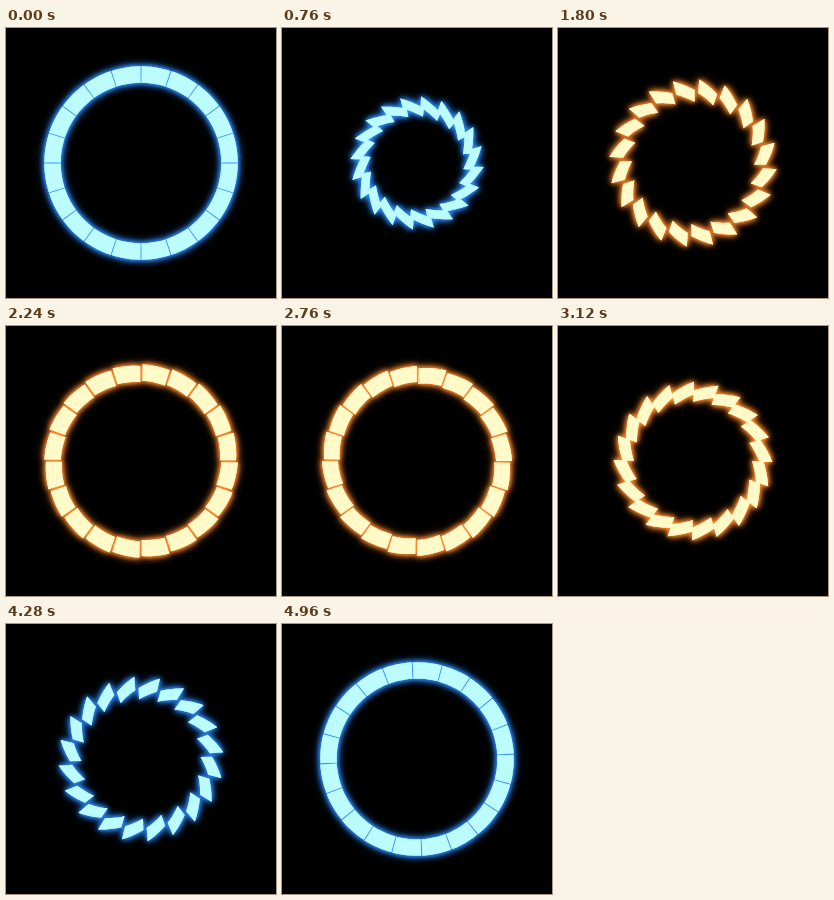
These frames come from a looping animation (270x270 px, 5 s). An HTML page with a canvas:

```html
<!DOCTYPE html>
<html>
<head>
<meta charset="utf-8">
<style>
  html, body { margin: 0; height: 100%; overflow: hidden; background: #000; }
  canvas { display: block; }
</style>
</head>
<body>
<canvas width="270" height="270"></canvas>
<script>
const ctx = document.querySelector('canvas').getContext('2d');
const LOOP = 5000, STEP = 40, COUNT = 20, CENTER = 135;
const INNER = 80.3, OUTER = 96.7, DEPTH = 820;
const SLICE = 2 * Math.PI / COUNT, GAP = 0.005, ARC_STEPS = 6;
const FRONT = { fill: '#bcfcff', glow: '#2f8cff' };
const BACK = { fill: '#fffac8', glow: '#ff8a30' };

// A point on a ring that is flipped by `flip` around the axis at `axis`.
function project(radius, angle, flip, axis) {
  const x = radius * Math.cos(angle);
  const y = radius * Math.sin(angle) * Math.cos(flip);
  const z = radius * Math.sin(angle) * Math.sin(flip);
  const scale = DEPTH / (DEPTH + z);
  const c = Math.cos(axis), s = Math.sin(axis);
  return [CENTER + scale * (x * c - y * s), CENTER + scale * (x * s + y * c)];
}

function addPanel(path, flip, axis) {
  const from = flip + GAP, span = SLICE - 2 * GAP;
  const points = [];
  for (let k = 0; k <= ARC_STEPS; k++) {
    const angle = from + span * k / ARC_STEPS;
    points.push(project(OUTER, angle, flip, axis));
    points.unshift(project(INNER, angle, flip, axis));
  }
  points.forEach(([x, y], k) => k ? path.lineTo(x, y) : path.moveTo(x, y));
  path.closePath();
}

function draw(time) {
  // Each panel slides along its ring at the same rate as that ring flips.
  const flip = 2 * Math.PI * time / LOOP;
  const { fill, glow } = Math.cos(flip) > 0 ? FRONT : BACK;
  const path = new Path2D();
  for (let i = 0; i < COUNT; i++) addPanel(path, flip, i * SLICE - Math.PI / 2);

  ctx.shadowBlur = 0;
  ctx.fillStyle = '#000';
  ctx.fillRect(0, 0, 270, 270);
  ctx.fillStyle = fill;
  ctx.shadowColor = glow;
  for (const blur of [10, 6, 4]) {
    ctx.shadowBlur = blur;
    ctx.fill(path);
  }
}

function tick() {
  draw(Math.floor(performance.now() % LOOP / STEP) * STEP);
  requestAnimationFrame(tick);
}
tick();
</script>
</body>
</html>
```
